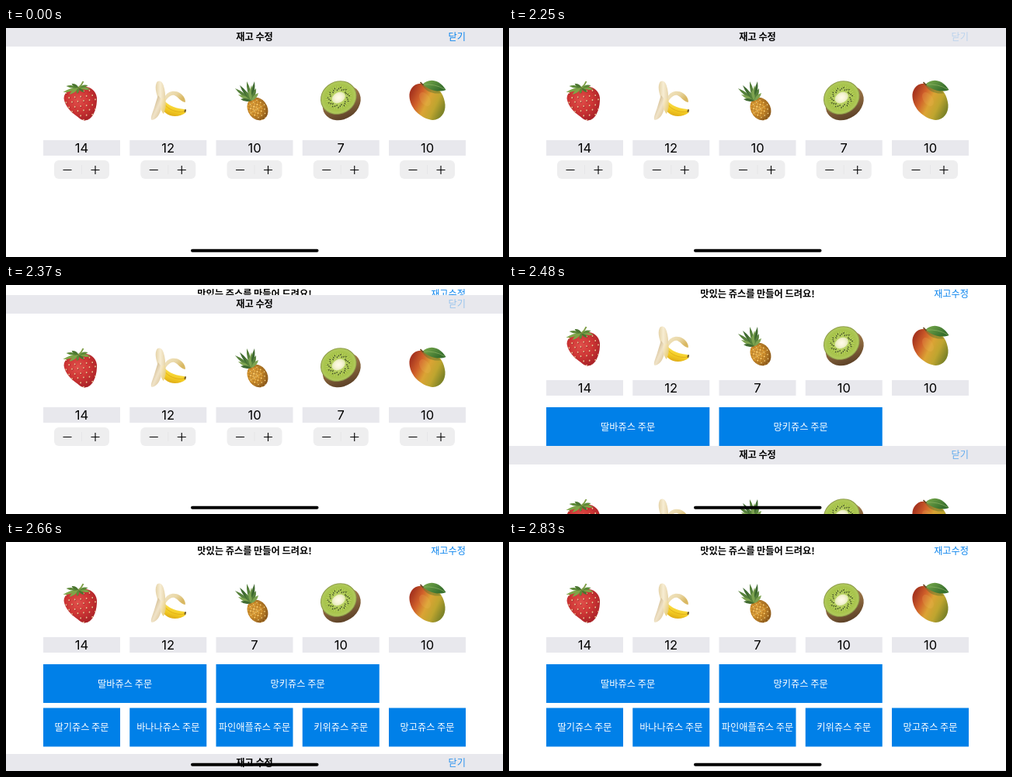
These frames come from a looping animation (640x296 px, 2.9 s). An HTML page with a canvas:

```html
<!DOCTYPE html>
<html lang="ko">
<head>
<meta charset="utf-8">
<title>재고 수정</title>
<style>
html, body { margin: 0; width: 100%; height: 100%; overflow: hidden; background: #fff; }
canvas { display: block; width: 640px; height: 296px; }
</style>
</head>
<body>
<canvas id="stage"></canvas>
<script>
const W = 640, H = 296, LOOP = 2900;
const canvas = document.getElementById('stage');
const ctx = canvas.getContext('2d');
const dpr = window.devicePixelRatio || 1;
canvas.width = W * dpr;
canvas.height = H * dpr;

const BLUE = '#0080e8', LINK = '#0a84ee', GREY = '#e8e8ed';
const HANGUL = '"Noto Sans CJK KR", "Noto Sans CJK", sans-serif';
const DIGITS = 'Inter, "Liberation Sans", sans-serif';

// The sheet moves on a coarse clock: [time, offset, close label opacity]
const STEPS = [
  [0, 0, 1], [2250, 0, 0.2], [2370, 13, 0.35], [2480, 208, 0.6],
  [2590, 274, 0.85], [2710, 292, 1], [2830, 295, 1]
];

const colX = i => 48 + i * 111.25;
const midX = i => colX(i) + 49.5;

function rect(x, y, w, h, color) {
  ctx.fillStyle = color;
  ctx.fillRect(x, y, w, h);
}

function pill(x, y, w, h, r, color) {
  ctx.fillStyle = color;
  ctx.beginPath();
  ctx.roundRect(x, y, w, h, r);
  ctx.fill();
}

function text(str, x, y, color, align = 'center', font = '12.2px ' + HANGUL) {
  ctx.font = font;
  ctx.textAlign = align;
  ctx.fillStyle = color;
  ctx.fillText(str, x, y);
}

const title = (str, y) => text(str, 320, y, '#000', 'center', '700 12.2px ' + HANGUL);

function shape(d, fill) {
  ctx.fillStyle = fill;
  ctx.fill(new Path2D(d));
}

function line(d, color, width) {
  ctx.strokeStyle = color;
  ctx.lineWidth = width;
  ctx.stroke(new Path2D(d));
}

function oval(x, y, rx, ry, rot, fill) {
  ctx.fillStyle = fill;
  ctx.beginPath();
  ctx.ellipse(x, y, rx, ry, rot, 0, Math.PI * 2);
  ctx.fill();
}

function stops(g, colors) {
  colors.forEach((c, i) => g.addColorStop(i / (colors.length - 1), c));
  return g;
}
const linear = (x0, y0, x1, y1, ...c) => stops(ctx.createLinearGradient(x0, y0, x1, y1), c);
const radial = (x, y, r, ...c) => stops(ctx.createRadialGradient(x, y, 0, x, y, r), c);

// Pointed leaves fanning out from a base point
function leaves(bx, by, width, tips, colors) {
  tips.forEach(([x, y], i) => {
    const n = width / Math.hypot(x - bx, y - by);
    const ox = (by - y) * n, oy = (x - bx) * n;
    const mx = (x + bx) / 2, my = (y + by) / 2;
    shape(`M${bx} ${by}Q${mx - ox} ${my - oy} ${x} ${y}Q${mx + ox} ${my + oy} ${bx} ${by}Z`,
      colors[i % colors.length]);
  });
}

function strawberry() {
  const body = 'M-23-3C-23-12-12-17-3-18C8-20 18-15 19.5-4C20 8 16 20 9 24C4 27-1 25-5 21C-14 15-22 6-23-3Z';
  shape(body, radial(-5, -1, 29, '#e0504b', '#cf3635', '#a51f26'));
  ctx.save();
  ctx.clip(new Path2D(body));
  for (let r = 0; r < 7; r++) {
    for (let c = 0; c < 6; c++) {
      const x = -20 + c * 7.5 + (r % 2) * 3.7, y = -10 + r * 6.2 - c * 0.8;
      oval(x + 0.4, y + 0.4, 1.2, 1.5, 0.2, '#a3262a');
      oval(x, y, 0.9, 1.1, 0.2, '#eec190');
    }
  }
  ctx.restore();
  leaves(-4, -17, 3.6,
    [[-24, -11], [-20, -19], [-13, -22], [-16, -8], [-6, -9], [3, -11], [11, -15], [8, -20]],
    ['#7ea548', '#5d8a38', '#4a7530']);
  line('M-4-17Q0-20 2-25', '#7f9f48', 2);
}

function banana() {
  shape('M-5-4C-1-13 9-14 15-10C20-7 23-1 22 2C16 1 13-5 8-7C3-8 0-4-4 1Z',
    linear(0, -12, 14, 2, '#f0e2bd', '#e9d7a6', '#d9b862'));
  shape('M-8-3C-3 3 6 10 21 11L23 15C16 21 4 22-3 16C-9 11-10 3-8-3Z',
    linear(2, 2, -3, 20, '#fbe04e', '#f3cb22', '#d8a114'));
  line('M-5 4C0 11 10 16 21 14', '#dba818', 0.8);
  shape('M-15-23C-13-27-8-26-6-20C-4-14-3-6-4 0L-12 1C-14-7-18-16-15-23Z',
    linear(-16, 0, -4, 0, '#e5d3a8', '#f7edd3', '#e8d6ac'));
  shape('M-13-7C-10-4-7 0-8 6C-9 14-13 24-21 25C-24 23-19 14-17 6Z',
    linear(-21, 8, -8, 14, '#d3bd92', '#f0e3c8', '#dfcaa0'));
  shape('M-10-3L-4-3C-2 3-3 11-6 17C-10 13-11 5-10-3Z',
    linear(-10, 4, -3, 6, '#f5e7c5', '#e9cf7c'));
  oval(22, 13, 1.2, 2, 0.3, '#77602a');
}

function pineapple() {
  ctx.save();
  ctx.translate(4, 10.5);
  ctx.rotate(-0.55);
  const body = new Path2D();
  body.ellipse(0, 0, 12.5, 15.5, 0, 0, Math.PI * 2);
  ctx.fillStyle = radial(-3, -3, 18, '#edb550', '#d7962f', '#86551b');
  ctx.fill(body);
  ctx.clip(body);
  for (let k = -30; k <= 30; k += 5) {
    line(`M${k - 16}-16L${k + 16} 16M${k + 16}-16L${k - 16} 16`, '#98621f80', 0.8);
  }
  for (let r = -3; r <= 3; r++) {
    for (let c = -2; c <= 2; c++) oval(c * 5 + (r & 1) * 2.5, r * 5, 0.8, 0.8, 0, '#f6d582');
  }
  ctx.restore();
  leaves(-4, 0, 4,
    [[-25, -16], [-21, -8], [-19, -20], [-10, -25], [-4, -20], [0, -25], [2, -16], [5, -10], [-18, -2], [-12, -13], [-7, -14]],
    ['#56813b', '#7da350', '#3f6a30']);
}

function kiwi() {
  oval(1, 2.5, 26, 21, -0.6, linear(0, -15, 14, 24, '#a8834f', '#83603a', '#553c24'));
  ctx.save();
  ctx.translate(-3, -4);
  ctx.rotate(-0.5);
  ctx.scale(1.14, 1);
  oval(0, 0, 21, 21, 0, '#8f9d4b');
  oval(0, 0, 20, 20, 0, radial(0, 0, 20, '#dbe8a2', '#b0cb56', '#a2c043', '#b1ca5c'));
  for (let i = 0; i < 32; i++) {
    const a = i * Math.PI / 16, c = Math.cos(a), s = Math.sin(a);
    line(`M${c * 6} ${s * 6}L${c * 15} ${s * 15}`, '#d5e59199', 0.6);
  }
  oval(0, 0, 8, 6.6, 0, radial(0, 0, 8, '#fffbe8', '#f7f4d8', '#e0e8b0'));
  for (let i = 0; i < 34; i++) {
    const a = i * Math.PI / 17, r = 9.7 + (i % 3) * 1.4;
    oval(Math.cos(a) * r, Math.sin(a) * r, 1, 0.6, a, '#3a4526');
  }
  ctx.restore();
}

function mango() {
  shape('M-6-22C-17-24-24-14-23-5C-22 8-12 20 2 24C14 28 24 18 23 5C22-6 16-16 8-19C3-21-2-22-6-22Z',
    linear(-21, -9, 21, 11, '#a8361f', '#d0602a', '#dba334', '#bfa52f', '#7f8428'));
  oval(-3, -2, 6, 10, -0.6, '#f4c06030');
  shape('M-8-22C0-18 10-16 18-10C9-8-2-11-8-22Z', '#61762c80');
  shape('M-6-21C0-28 14-30 24-14C14-10 2-14-6-21Z',
    linear(2, -26, 13, -12, '#6c9f46', '#376f2d'));
  line('M-5-21Q10-22 22-15', '#98ba6c', 0.6);
  line('M-9-24L-5-20', '#6b4a28', 1.7);
}

const FRUITS = [strawberry, banana, pineapple, kiwi, mango];

function stockRow(fruitY, labelY, counts) {
  FRUITS.forEach((draw, i) => {
    ctx.save();
    ctx.translate(midX(i), fruitY);
    draw();
    ctx.restore();
    rect(colX(i), labelY, 99, 20, GREY);
    text(counts[i], midX(i), labelY + 16, '#000', 'center', '16.5px ' + DIGITS);
  });
}

function button(label, x, y, w) {
  rect(x, y, w, 50, BLUE);
  text(label + ' 주문', x + w / 2, y + 29.5, '#fff');
}

function drawShop() {
  title('맛있는 쥬스를 만들어 드려요!', 15.5);
  text('재고수정', 592, 15.5, LINK, 'right');
  stockRow(79, 123, [14, 12, 7, 10, 10]);
  button('딸바쥬스', colX(0), 158, 210.25);
  button('망키쥬스', colX(2), 158, 210.25);
  ['딸기쥬스', '바나나쥬스', '파인애플쥬스', '키위쥬스', '망고쥬스']
    .forEach((name, i) => button(name, colX(i), 214.5, 99));
}

function stepper(x, y) {
  pill(x, y, 71, 24, 6, '#eeeeef');
  rect(x + 35, y + 6, 1, 12, '#e6e6e8');
  line(`M${x + 11.5} ${y + 12.5}h11M${x + 47.5} ${y + 12.5}h11M${x + 53} ${y + 7}v11`, '#000', 1.1);
}

function drawSheet(y, closeAlpha) {
  ctx.save();
  ctx.translate(0, y);
  rect(0, 0, W, H, '#fff');
  rect(0, 0, W, 24, GREY);
  title('재고 수정', 16);
  ctx.globalAlpha = closeAlpha;
  text('닫기', 592, 16, LINK, 'right');
  ctx.globalAlpha = 1;
  stockRow(94, 145, [14, 12, 10, 7, 10]);
  FRUITS.forEach((_, i) => stepper(colX(i) + 14, 171));
  ctx.restore();
}

function frame(now) {
  const t = now % LOOP;
  const [, y, alpha] = STEPS.findLast(s => s[0] <= t);
  ctx.setTransform(dpr, 0, 0, dpr, 0, 0);
  rect(0, 0, W, H, '#fff');
  drawShop();
  drawSheet(y, alpha);
  pill(238, 285.7, 164.5, 4, 2, '#000');
}

let start;
function tick(now) {
  start ??= now;
  frame(Math.max(0, now - start));
  requestAnimationFrame(tick);
}
frame(0);
requestAnimationFrame(tick);
</script>
</body>
</html>
```
